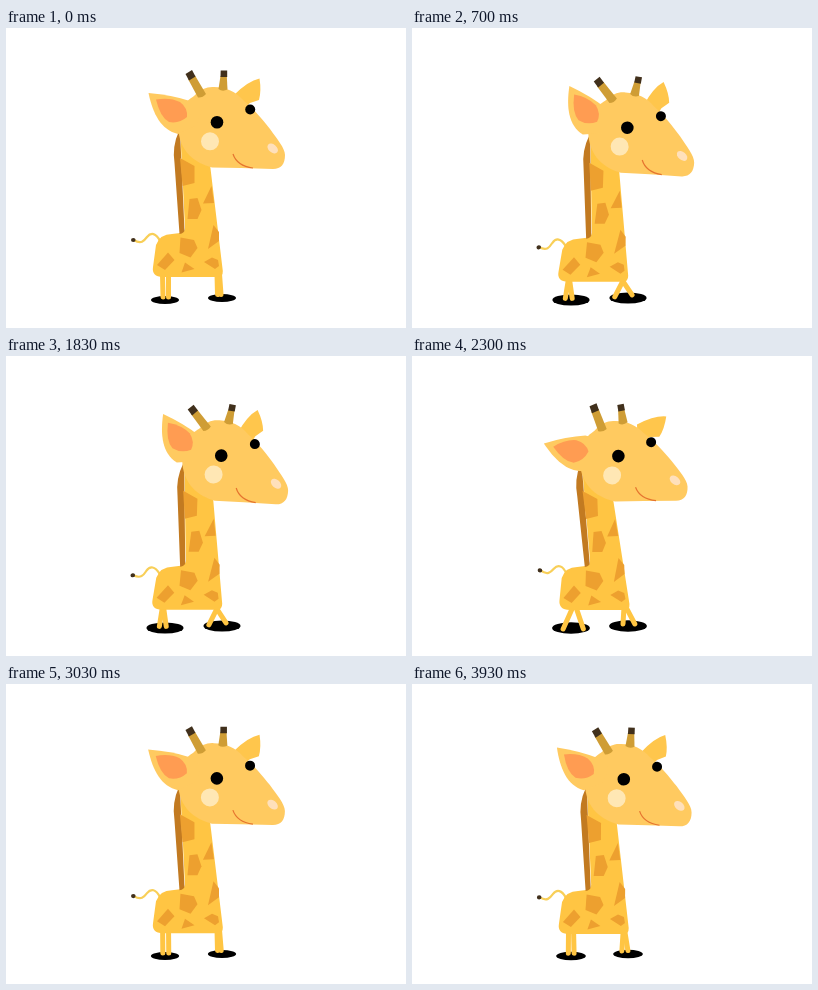
An HTML page for the animation above (3960 ms loop, 400 px wide and 300 px high).

```html
<!DOCTYPE html>
<html lang="en">
<head>
<meta charset="utf-8">
<title>Giraffe</title>
<style>
  html, body { margin: 0; width: 100%; height: 100%; overflow: hidden; background: #fff; }
  svg { display: block; width: 100vw; height: 100vh; }
  .skin { fill: #ffc543; }
  .face { fill: #ffca60; }
  .spot { fill: #eda02f; }
  .horn { fill: #cf9d35; }
  .dark { fill: #41301c; }
  .pale { fill: #ffe7b4; }
  .leg { stroke: #ffc543; stroke-width: 5; stroke-linecap: round; }
</style>
</head>
<body>
<svg viewBox="0 0 400 300">
  <ellipse id="hindShadow" cx="159" cy="272"/>
  <ellipse id="foreShadow" cx="216" cy="270"/>
  <g id="legs">
    <line class="leg"/><line class="leg"/><line class="leg"/><line class="leg"/>
  </g>

  <g id="body">
    <g id="tail">
      <path d="M154 213C150 205 145 204 141 209C138 213 135 216.500 128 212" fill="none" stroke="#f8cf58" stroke-width="2.200"/>
      <ellipse class="dark" cx="127.300" cy="212" rx="2.300" ry="2.100"/>
    </g>
    <path class="skin" d="M174 98L203 128L216.800 243Q217 249 212 249H157C149 249 146 245 147 239L150 217Q154 206 166 206L174 205Q179 204 179 200Z"/>
    <path d="M173 103Q166 118 168.500 135L173.500 206Q178.500 205 178.500 202L174 103Z" fill="#c27a21"/>
    <g class="spot">
      <path d="M174 130L188.500 138V155L176.500 158Z"/>
      <path d="M183.500 171L191.500 170L195.500 182L191.500 191H181.500Z"/>
      <path d="M205.500 158L208 175L197 175.500Z"/>
      <path d="M207.500 197L213 204V213L202 221Z"/>
      <path d="M174.500 209.500L188 212L191.500 220L184.500 229.500L173.500 225Z"/>
      <path d="M162 224.500L168.500 232L159 242L151 237Z"/>
      <path d="M179 234.500L188.500 241L175.500 244.500Z"/>
      <path d="M198 234L206 229.500L212 232L213 238L209 241Z"/>
    </g>
  </g>

  <g id="head">
    <path id="farEar" d="M228 67Q242 53 253.500 50.500Q255.500 63 253 72L244 75L234 84Z" fill="#ffc64c"/>
    <path class="face" d="M172 98C172 80 179 74 188 68C195 61 201 58.500 208 59C220 59 230 64 237 72C247 80 257 92 264 101C271 111 279 120 279 127C279 136 275 141 267 141L235 140L206 139.500C190 135 173 125 172 98Z"/>
    <g id="nearEar">
      <path class="face" d="M142.500 65Q166 67 184 73L196 82L190 98L172 106C155 102 147 86 142.500 65Z"/>
      <path d="M150 71.500Q164 69 174 74Q182 80 181 89Q173 96 163 94Q154 89 150 71.500Z" fill="#ff9c52"/>
    </g>
    <g id="leftHorn">
      <path class="horn" d="M182 51L189 47.500L200 66Q196.500 70 192 69.500Z"/>
      <path class="dark" d="M179.500 46L186 42L189.500 48.500L183 52.500Z"/>
    </g>
    <g id="rightHorn">
      <path class="horn" d="M214.500 48H220.800L221.500 61.500Q216.500 64 212.500 61Z"/>
      <path class="dark" d="M214.700 42.500H221.200V49H214.500Z"/>
    </g>
    <circle cx="211" cy="94.200" r="6.300"/>
    <circle cx="244.200" cy="81.500" r="5"/>
    <circle class="pale" cx="204" cy="113.300" r="9"/>
    <ellipse cx="266.700" cy="120.500" rx="6" ry="4" transform="rotate(40 266.700 120.500)" fill="#ffe0bb"/>
    <path d="M227 126Q231 138 247 140" fill="none" stroke="#e5742f" stroke-width="1.200"/>
  </g>
</svg>
<script>
  const LOOP = 3960, FPS = 30, STEP = 1000;
  const part = id => document.getElementById(id);
  const move = (id, value) => part(id).setAttribute('transform', value);
  const mix = (a, b, k) => a + (b - a) * k;

  // Depth of one dip: [share of a step, depth]
  const dip = [[0, 0], [.03, .02], [.067, .1], [.1, .27], [.17, .66], [.2, .92], [.25, 1.02],
    [.3, .98], [.333, .91], [.367, .68], [.4, .38], [.433, .17], [.467, .05], [.5, 0]];

  // Each leg as [top x, foot x, foot y]: upright, leaning left, leaning right
  const legs = [
    { rest: [156.5, 157, 269], left: [161, 151, 273], right: [156.5, 153, 270.5] },
    { rest: [162.5, 162.5, 269], left: [164, 171.5, 273], right: [157, 160, 270.5] },
    { rest: [211, 211.5, 266.5], left: [212, 211, 268], right: [212, 202, 269] },
    { rest: [213.5, 215, 266.5], left: [214, 223, 268], right: [209, 220.5, 267] }
  ];

  function depth(p) {
    const i = Math.max(1, dip.findIndex(d => d[0] >= p));
    const [p0, d0] = dip[i - 1], [p1, d1] = dip[i];
    return mix(d0, d1, (p - p0) / (p1 - p0));
  }

  function shadow(id, g) {
    part(id).setAttribute('rx', 14 + 5 * g);
    part(id).setAttribute('ry', 4 + 1.7 * g);
  }

  function draw(time) {
    // The picture holds between ticks of 30 per second.
    const ms = Math.floor(time % LOOP / 10) * 10;
    const tick = Math.floor((ms + 5) * FPS / 1000);
    const phase = tick / FPS * 1000 / STEP % 1;
    const g = depth(phase % .5);
    const lean = phase < .5 ? -g : g;
    const skew = .037 * lean;

    move('body', `matrix(1 0 ${-skew} 1 ${225 * skew} ${5.2 * g})`);
    move('tail', `translate(${-1.3 * lean}) rotate(${-6 * lean} 154 210)`);
    move('head', `translate(${4.7 * lean} ${6 * g}) rotate(${2.1 * lean} 211 94)`);
    move('nearEar', `rotate(${20 * lean} 180 88)`);
    move('farEar', `rotate(${-20 * lean} 240 73)`);
    move('leftHorn', `rotate(${-11 * lean} 196 68)`);
    move('rightHorn', `rotate(${9 * lean} 217 62)`);
    shadow('hindShadow', g);
    shadow('foreShadow', g);

    legs.forEach((leg, i) => {
      const goal = lean < 0 ? leg.left : leg.right;
      const [top, foot, ground] = leg.rest.map((v, k) => mix(v, goal[k], g));
      const line = part('legs').children[i];
      const ends = { x1: top, y1: 246 + 5.2 * g, x2: foot, y2: ground };
      for (const name in ends) line.setAttribute(name, ends[name]);
    });
  }

  const start = performance.now();
  function run() {
    draw(performance.now() - start);
    requestAnimationFrame(run);
  }
  run();
</script>
</body>
</html>
```
